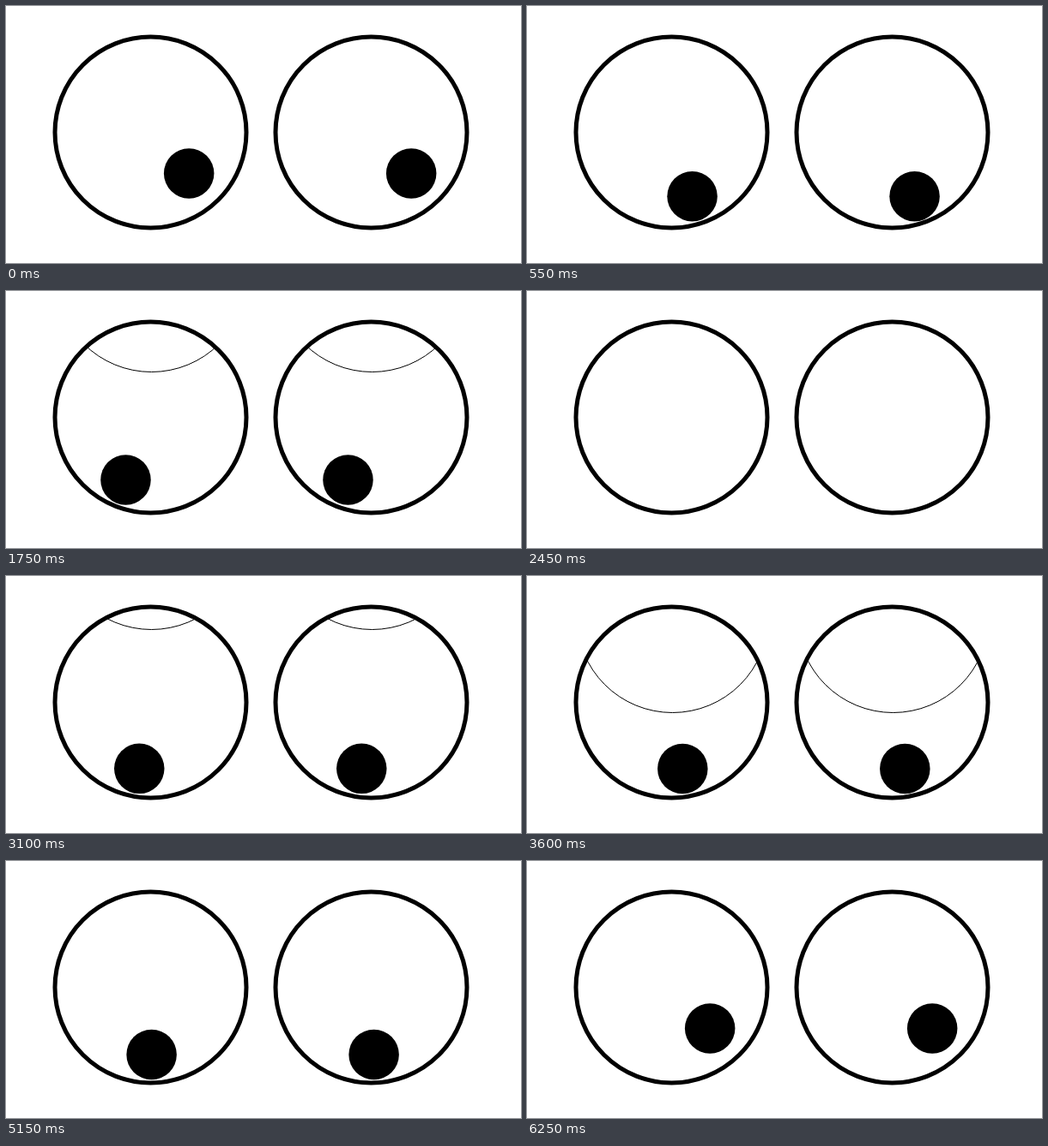
Write an HTML page that moves like this. It is 600x300 px and loops after 6.3 s.

```html
<!DOCTYPE html>
<html lang="en">
<head>
<meta charset="utf-8">
<title>Googly eyes</title>
<style>
  html, body { margin: 0; width: 100%; height: 100%; overflow: hidden; background: #fff; }
  svg { display: block; width: 600px; height: 300px; }
  .lid { fill: #fff; stroke: #000; stroke-width: 1; }
  .rim { fill: none; stroke: #000; stroke-width: 5; }
</style>
</head>
<body>
<svg viewBox="0 0 600 300">
  <defs>
    <clipPath id="ball"><circle cx="168.5" cy="147.5" r="111.5"/></clipPath>
    <g id="eye">
      <g clip-path="url(#ball)"><circle id="lid" class="lid" cx="169.5" r="111.5"/></g>
      <circle class="rim" cx="168.5" cy="147.5" r="111.5"/>
    </g>
    <circle id="pupil" r="29.25"/>
  </defs>
  <use href="#pupil"/>
  <use href="#pupil" x="259"/>
  <use href="#eye"/>
  <use href="#eye" x="257"/>
</svg>
<script>
const LOOP = 6300, TICK = 50;
const EYE = { x: 168.5, y: 147.5, r: 111.5 };
const RIGHT = 43;

// The pupil swings around the eye; angles are degrees from straight down.
const swings = [
  { from: 0, to: 1500, angle: -21.7 },
  { from: 2900, to: 3450, angle: 9.4 },
  { from: 3900, to: 4450, angle: -11.7 },
  { from: 4850, to: 6250, angle: RIGHT }
];

// The lid sinks slowly from "shut" on and springs back at "open".
const blinks = [
  { shut: 1650, open: 2500 },
  { shut: 3050, open: 3550 },
  { shut: 4050, open: 4900 }
];

const clamp = (v, lo, hi) => Math.min(hi, Math.max(lo, v));
const easeOut = k => 1 - (1 - k) ** 1.077;

function angleAt(t) {
  return swings.reduce((a, s) => {
    const k = clamp((t - s.from) / (s.to - s.from), 0, 1);
    return a + (s.angle - a) * easeOut(k);
  }, RIGHT);
}

// The orbit bends inwards towards its right end.
function pupilAt(t) {
  const angle = angleAt(t), rad = angle * Math.PI / 180;
  const reach = 78.5 - 13 * (Math.max(0, angle) / RIGHT) ** 6;
  return [EYE.x + reach * Math.sin(rad), EYE.y + reach * Math.cos(rad)];
}

// Lower edge of the lid; small values lie above the eye.
function lidAt(t) {
  const blink = blinks.findLast(b => t >= b.shut);
  if (!blink) return 0;
  if (t >= blink.open) return Math.max(0, 223.5 - 64 * Math.floor((t - blink.open + 50) / 100));
  return Math.min(EYE.y + EYE.r, 62.5 + 32 * Math.floor((t - blink.shut) / 100));
}

const pupil = document.getElementById('pupil');
const lid = document.getElementById('lid');
const start = performance.now();

function draw(now) {
  const t = Math.floor((Math.max(0, now - start) % LOOP) / TICK) * TICK;
  const [x, y] = pupilAt(t);
  pupil.setAttribute('cx', x);
  pupil.setAttribute('cy', y);
  lid.setAttribute('cy', lidAt(t) - EYE.r);
  requestAnimationFrame(draw);
}
draw(start);
</script>
</body>
</html>
```
